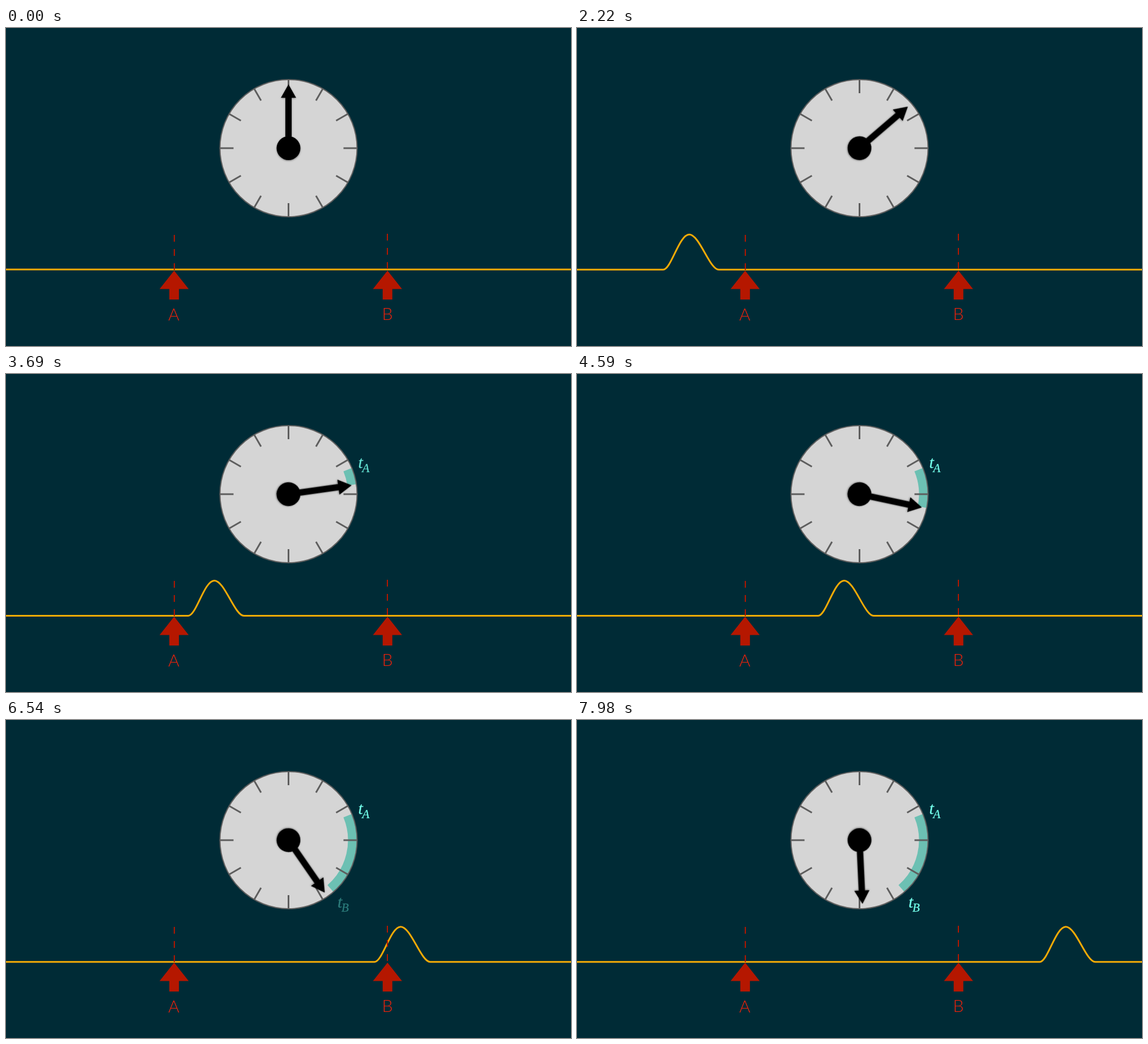
An HTML page for the animation above (8 s loop, 997x561 px).

```html
<!DOCTYPE html>
<html lang="en">
<head>
<meta charset="utf-8">
<title>Pulse travel time</title>
<style>
  html, body { margin: 0; width: 100%; height: 100%; overflow: hidden; background: #002b36; }
  svg { display: block; width: 100vw; height: 100vh; }
  .place { font: 300 30px Lato, "Open Sans", sans-serif; fill: #ee220c; text-anchor: middle; }
  .time { font: italic 30px "Liberation Serif", "Noto Serif", serif; fill: #73fdea; stroke: #73fdea; stroke-width: .3; }
  .sub { font-size: 21px; }
  .hand { filter: drop-shadow(0 1.5px 1.5px rgba(0, 0, 0, .5)); }
</style>
</head>
<body>
<svg viewBox="0 0 997 561">
  <defs>
    <path id="marker" d="M0 428 L25.7 460.5 H8.5 V479 H-8.5 V460.5 H-25.7 Z" fill="#b51700"/>
    <path id="dashes" d="M0 365 V427" stroke="#b51700" stroke-width="2" stroke-dasharray="12 13"/>
  </defs>

  <g transform="translate(498.5 212)">
    <circle r="121" fill="#d5d5d5"/>
    <path id="arc" fill="none" stroke="#6cc0b3" stroke-width="15.5"/>
    <g id="ticks" stroke="#5e5e5e" stroke-width="3"></g>
    <circle r="121" fill="none" stroke="#5e5e5e" stroke-width="2"/>
    <g id="hand">
      <g class="hand">
        <circle r="21"/>
        <path d="M-5.5 0 V-89 H-13.3 L0 -112.5 L13.3 -89 H5.5 V0 Z"/>
      </g>
    </g>
  </g>

  <g id="labelA" class="time"><text x="621.5" y="166">t</text><text class="sub" x="628.5" y="173">A</text></g>
  <g id="labelB" class="time"><text x="585" y="331">t</text><text class="sub" x="592" y="338">B</text></g>

  <path id="wave" fill="none" stroke="#f5ab06" stroke-width="3"/>

  <use href="#dashes" x="297"/>
  <use href="#dashes" x="673" y="-2"/>
  <use href="#marker" x="296.7"/>
  <use href="#marker" x="673.2"/>
  <text class="place" x="296" y="516" font-style="italic">A</text>
  <text class="place" x="673" y="515">B</text>
</svg>
<script>
  const LOOP = 8000, STEP = 30;
  const DEGREES_PER_MS = 180 / 8100;
  const ARC_START = 67.5, ARC_END = 139, ARC_RADIUS = 112.7;
  const FADE = 750;
  const byId = id => document.getElementById(id);

  byId("ticks").innerHTML = Array.from({ length: 12 }, (_, i) =>
    `<path d="M0 -97 V-121" transform="rotate(${i * 30})"/>`).join("");

  // Angles run clockwise from twelve o'clock.
  function onArc(degrees) {
    const a = degrees * Math.PI / 180;
    return `${ARC_RADIUS * Math.sin(a)} ${-ARC_RADIUS * Math.cos(a)}`;
  }

  function fadeIn(id, t, angle) {
    const start = angle / DEGREES_PER_MS;
    byId(id).setAttribute("opacity", Math.max(0, Math.min(1, (t - start) / FADE)));
  }

  function draw(t) {
    const angle = t * DEGREES_PER_MS;
    byId("hand").setAttribute("transform", `rotate(${angle})`);

    const end = Math.min(angle - 0.4, ARC_END);
    byId("arc").setAttribute("d", end > ARC_START
      ? `M${onArc(ARC_START)} A${ARC_RADIUS} ${ARC_RADIUS} 0 0 1 ${onArc(end)}` : "");

    fadeIn("labelA", t, ARC_START);
    fadeIn("labelB", t, ARC_END);

    const peak = -58 + 0.11536 * t;
    const base = 426.1 + 0.7 * t / LOOP;
    byId("wave").setAttribute("d", `M-200 ${base} H${peak - 46}
      c14 0 28 -62 46 -62 c18 0 36 62 52 62 H1000`);
  }

  function frame() {
    const t = performance.now() % LOOP;
    draw(Math.floor(t / STEP) * STEP);
    requestAnimationFrame(frame);
  }
  frame();
</script>
</body>
</html>
```
